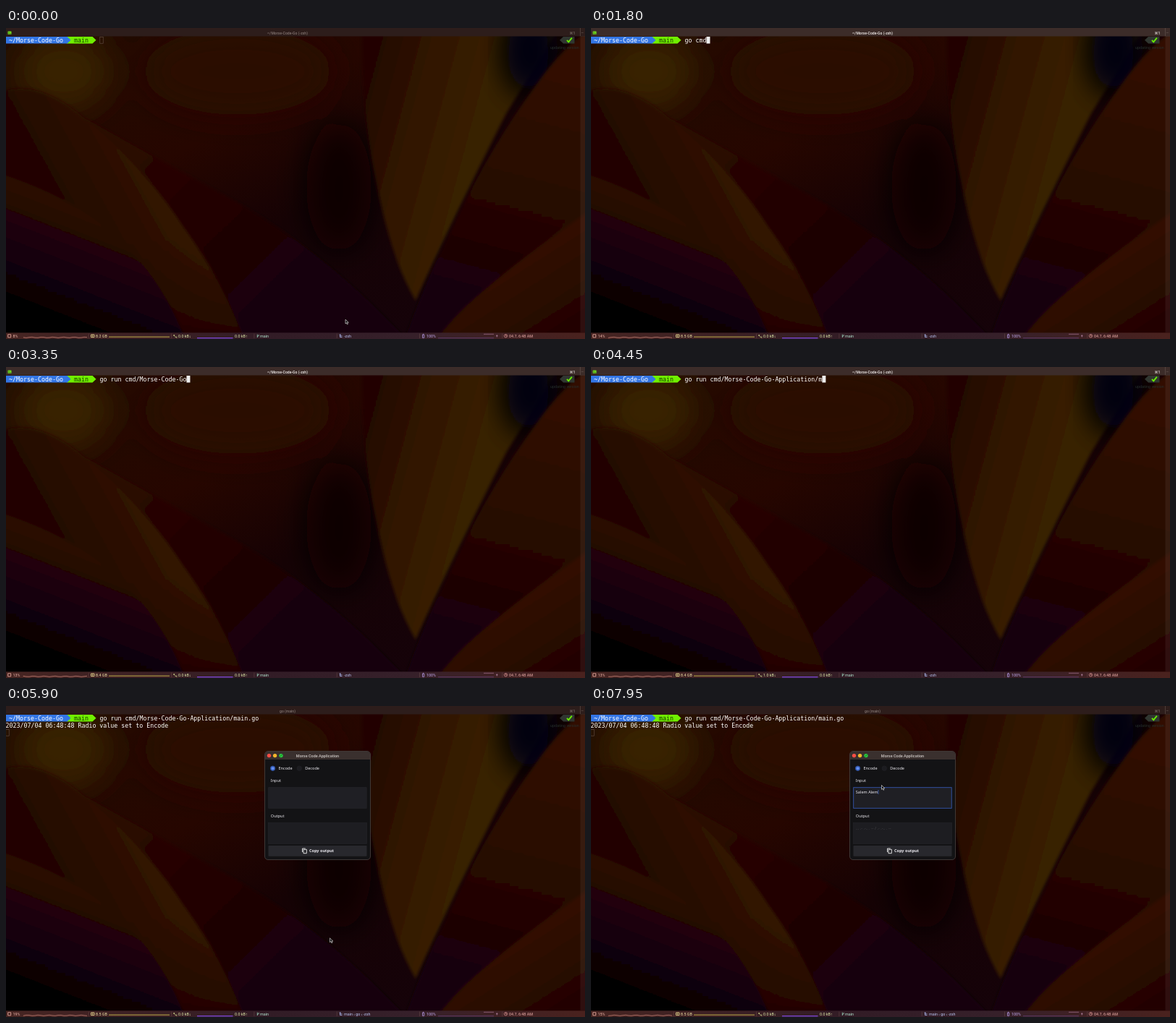
Animation of 800x430 px, one loop 8000 ms. Source, as an HTML page:

```html
<!DOCTYPE html>
<html lang="en">
<head>
<meta charset="utf-8">
<title>Terminal session</title>
<style>
html, body { margin: 0; width: 100%; height: 100%; overflow: hidden; background: #1c0401; }
svg { display: block; width: 100vw; height: 100vh; }
text { white-space: pre; }
.mono { font: 8.3px "DejaVu Sans Mono", monospace; fill: #fff; }
.bar { font: 500 5.1px Roboto, sans-serif; }
.status { font: 5.4px Roboto, sans-serif; }
.app { font: 5.55px "Noto Sans", sans-serif; fill: #eceaf0; }
</style>
</head>
<body>
<svg viewBox="0 0 800 430" preserveAspectRatio="none">
  <defs>
    <filter id="soft" x="-10%" y="-10%" width="120%" height="120%"><feGaussianBlur stdDeviation="2"/></filter>
    <filter id="haze" x="-50%" y="-50%" width="200%" height="200%"><feGaussianBlur stdDeviation="22"/></filter>
    <linearGradient id="base" x2="1" y2="1">
      <stop stop-color="#210d00"/><stop offset=".35" stop-color="#260600"/>
      <stop offset=".55" stop-color="#160204"/><stop offset="1" stop-color="#15030c"/>
    </linearGradient>
    <linearGradient id="mid" gradientUnits="userSpaceOnUse" x1="170" y1="150" x2="440" y2="430">
      <stop stop-color="#2b0800"/><stop offset=".45" stop-color="#200303"/><stop offset="1" stop-color="#13020d"/>
    </linearGradient>
    <linearGradient id="leaf" gradientUnits="userSpaceOnUse" x1="60" y1="260" x2="215" y2="175">
      <stop stop-color="#200400"/><stop offset=".55" stop-color="#2b0c00"/><stop offset="1" stop-color="#361c00"/>
    </linearGradient>
    <linearGradient id="leafEnd" gradientUnits="userSpaceOnUse" x1="0" y1="290" x2="0" y2="425">
      <stop stop-color="#240500" stop-opacity="0"/><stop offset="1" stop-color="#240500"/>
    </linearGradient>
    <linearGradient id="low" gradientUnits="userSpaceOnUse" x1="95" y1="225" x2="30" y2="390">
      <stop stop-color="#300d00"/><stop offset=".4" stop-color="#200508"/><stop offset="1" stop-color="#030206"/>
    </linearGradient>
    <linearGradient id="gold" gradientUnits="userSpaceOnUse" x1="490" y1="120" x2="640" y2="160">
      <stop stop-color="#230600"/><stop offset=".45" stop-color="#301500"/><stop offset="1" stop-color="#392000"/>
    </linearGradient>
    <linearGradient id="right" gradientUnits="userSpaceOnUse" x1="730" y1="60" x2="640" y2="400">
      <stop stop-color="#300f00"/><stop offset=".5" stop-color="#270700"/><stop offset="1" stop-color="#15030b"/>
    </linearGradient>
    <linearGradient id="corner" gradientUnits="userSpaceOnUse" x1="700" y1="320" x2="770" y2="430">
      <stop stop-color="#320d00"/><stop offset="1" stop-color="#220400"/>
    </linearGradient>
    <linearGradient id="foot">
      <stop stop-color="#472522"/><stop offset=".45" stop-color="#321c26"/>
      <stop offset=".7" stop-color="#36202a"/><stop offset="1" stop-color="#4a221e"/>
    </linearGradient>
  </defs>

  <rect width="800" height="430" fill="url(#base)"/>
  <g filter="url(#haze)">
    <ellipse cx="80" cy="60" rx="65" ry="55" fill="#382200"/>
    <ellipse cx="320" cy="60" rx="130" ry="60" fill="#2c0a00"/>
    <ellipse cx="460" cy="220" rx="45" ry="90" fill="#110103"/>
  </g>
  <g filter="url(#soft)">
    <path d="M110 125Q180 165 300 230Q430 300 545 422V440H320Z" fill="url(#mid)"/>
    <path id="left" d="M-10 90Q40 70 100 118Q190 190 245 275Q300 350 332 440H-10Z" fill="url(#leaf)"/>
    <path d="M-10 270H250Q300 350 332 440H-10Z" fill="url(#leafEnd)"/>
    <path d="M-10 201Q100 236 165 300Q220 355 252 440H-10Z" fill="url(#low)"/>
    <path d="M493-10Q488 110 516 235Q535 325 566 377Q605 290 690 120L770-10Z" fill="url(#gold)"/>
  </g>
  <ellipse cx="727" cy="28" rx="36" ry="62" fill="#030208" filter="url(#haze)"/>
  <ellipse cx="722" cy="34" rx="28" ry="54" fill="#04030a" filter="url(#haze)"/>
  <g filter="url(#soft)">
    <path d="M548 440Q575 360 612 285Q665 170 735 75Q770 25 810 0V440Z" fill="url(#right)"/>
    <path d="M810 250Q715 315 650 372Q615 402 588 440H810Z" fill="url(#corner)"/>
  </g>

  <rect id="head" width="800" height="11.5"/>
  <rect x="793.5" y="11" width="6.5" height="410" fill="#fff" opacity=".06"/>
  <path d="M793.5 0V11M794.8 6.5h3" stroke="#776762" stroke-width=".7" opacity=".6"/>
  <g id="termIcon"><rect x="2.5" y="4.6" width="5" height="4.2" rx=".6" fill="#6fd321"/><path d="M3.4 6l1 .8-1 .8M5 7.8h1.5" fill="none" stroke="#203c08" stroke-width=".5"/></g>
  <circle id="gear" cx="4.5" cy="6.7" r="2" fill="none" stroke="#a99f9b" stroke-width="1" stroke-dasharray="1 .4"/>
  <text id="title" class="bar" x="389" y="8.5" text-anchor="middle"></text>
  <text id="tab" class="bar" x="782.5" y="8.5" text-anchor="middle">⌘1</text>

  <path d="M84 12h35.5l5 4.75-5 4.75H84Z" fill="#70f000"/>
  <path d="M0 12h84.500l5 4.750-5 4.750H0Z" fill="#3375e4"/>
  <text class="mono" x="4" y="19.600">~/Morse-Code-Go</text>
  <text class="mono" x="94" y="19.600" style="fill:#173900">main</text>
  <path d="M785.500 12h-15.500l-5 4.750 5 4.750h15.500Z" fill="#303630"/>
  <path d="M775 16.800l2.300 2.500 4.600-5.600" fill="none" stroke="#68ee00" stroke-width="1.900"/>
  <text class="status" x="752" y="28.500" fill="#26302c">updating version</text>
  <text id="cmd" class="mono" x="129.500" y="19.600"></text>
  <text id="log" class="mono" x="-.5" y="29.900">2023/07/04 06:48:48 Radio value set to Encode</text>
  <rect id="caret" width="5" height="9.500"/>

  <g id="app">
    <rect x="357.500" y="62.500" width="146" height="150" rx="4.500" fill="#131315" stroke="#4a4340" stroke-width=".8"/>
    <path d="M358 74v-7q0-4 4-4h137q4 0 4 4v7Z" fill="#3a302e"/>
    <circle cx="363.500" cy="68.600" r="2.700" fill="#fb4e45"/>
    <circle cx="371.600" cy="68.600" r="2.700" fill="#f5b52b"/>
    <circle cx="380" cy="68.600" r="2.700" fill="#2bc840"/>
    <path d="M378.800 69.800l2.400-2.400" stroke="#0c6a18" stroke-width=".9"/>
    <text x="430.500" y="70.500" text-anchor="middle" style="font:700 5.5px Roboto,sans-serif" fill="#b9b2af">Morse Code Application</text>
    <circle cx="368.600" cy="86.200" r="3.200" fill="#4773d6" stroke="#2c4b94" stroke-width="1"/>
    <circle cx="368.600" cy="86.200" r="1.500" fill="#6c95f2"/>
    <circle cx="405.300" cy="86.200" r="3.300" fill="#1c1c20" stroke="#222228" stroke-width=".6"/>
    <text class="app" x="376.500" y="88.200">Encode</text>
    <text class="app" x="413.200" y="88.200">Decode</text>
    <text class="app" x="365.800" y="104.900">Input</text>
    <text class="app" x="365.800" y="153.800">Output</text>
    <rect id="entry" x="362.700" y="112.700" width="135.500" height="28.600" fill="#1f1f24"/>
    <text id="input" class="app" x="365.800" y="121"></text>
    <path id="bar" d="M0 116v6" stroke="#4f78dc" stroke-width=".7"/>
    <rect x="362.500" y="161.500" width="136" height="29" fill="#1d1d21" stroke="#26262b" stroke-width=".6"/>
    <text id="output" class="app" x="365.800" y="170.500" style="fill:#45454b"></text>
    <rect x="362.500" y="193" width="136" height="14.800" rx=".8" fill="#28282d"/>
    <path d="M409.500 202v-5h4.200M411 198.300h4.300v5.400H411Z" fill="none" stroke="#eee" stroke-width=".9"/>
    <text class="app" x="419" y="202.300" font-weight="700" style="font-weight:700">Copy output</text>
  </g>

  <rect y="421.300" width="800" height="8.700" fill="url(#foot)"/>
  <g id="status" class="status"></g>

  <path id="arrow" d="M0 0v5.800l1.400-1.200 1 2.200 1-.5-1-2.100h1.900Z" fill="#111" stroke="#eee" stroke-width=".6"/>
  <path id="beam" d="M-1.500-3.500q1.500 0 1.500 1v5q0 1-1.500 1M1.500-3.500Q0-3.500 0-2.500v5q0 1 1.500 1M-1 .8h2" fill="none" stroke="#e8e8ea" stroke-width=".7"/>
</svg>
<script>
const LOOP = 8000;
const FOCUS = 800, RUN = 4850, LOG = 5300, OPEN = 5800, CLICK = 6300;
const NS = "http://www.w3.org/2000/svg";
const $ = id => document.getElementById(id);
const show = (id, on) => $(id).setAttribute("visibility", on ? "visible" : "hidden");
const set = (el, attrs) => { for (const k in attrs) el.setAttribute(k, attrs[k]); return el; };
const write = (el, s) => { if (el.textContent !== s) el.textContent = s; };

// Keystrokes: start time, interval, text kept before, text typed after it
const typing = [
  [1000, 140, "", "go cmd"],
  [1900, 110, "go ", ""],
  [2150, 110, "go ", "run cmd/M"],
  [3150, 0, "go run cmd/", "Morse-Code-Go"],
  [3600, 150, "go run cmd/Morse-Code-Go", "-A"],
  [4050, 0, "go run cmd/Morse-Code-Go-", "Application/"],
  [4350, 0, "go run cmd/Morse-Code-Go-Application/", "m"],
  [4600, 0, "go run cmd/Morse-Code-Go-Application/", "main.go"]
];
const at = (rows, t) => rows.filter(r => r[0] <= t).pop();

function command(t) {
  const row = at(typing, t);
  if (!row) return "";
  const [start, gap, keep, add] = row;
  const n = gap ? Math.floor((t - start) / gap) + 1 : add.length;
  if (!add) return keep + "cmd".slice(0, Math.max(0, 3 - n));
  return keep + add.slice(0, n);
}

const morse = { s: "...", a: ".-", l: ".-..", e: ".", m: "--", " ": "/" };
const encode = s => [...s.toLowerCase()].map(c => morse[c]).join(" ");

// Status line
const load = [[0, 8, "8.2"], [950, 14, "8.5"], [2950, 13, "8.4"], [4950, 19, "8.5"], [5950, 17, "8.5"], [7000, 15, "8.5"]];
function add(tag, attrs) { return $("status").appendChild(set(document.createElementNS(NS, tag), attrs)); }
function label(x, fill, s = "") {
  const el = add("text", { x, y: 427.8, fill });
  el.textContent = s;
  return el;
}
function line(d, stroke, width = 0.7) { return add("path", { d, stroke, fill: "none", "stroke-width": width }); }

for (let i = 1; i < 7; i++) line(`M${i * 114.3} 422.500v6.500`, "#6a4d4b", 0.5);
line("M2.700 423.800h4v4h-4Z", "#e0a59a", 0.9);
line("M117.500 424h4.500v3.600h-4.500ZM119.700 424v3.600", "#e2d38e", 0.9);
line("M231.500 424l1.500 2M233 424l-1.500 2M233 426.500l2.500 1.500M235.800 426.500v2", "#cfd98f", 0.8);
line("M347.300 428v-4.300M347.300 426.500q2 0 2-2.500", "#9fd8c0", 0.8);
line("M460.500 424h2.500M461.500 424v3.500h3M461.500 425.800h3", "#a9b4ea", 0.8);
line("M575.500 424h2.200v4.300h-2.200ZM576 423.300h1.200", "#b59be6", 0.8);
line("M678.300 424v3.500M677 425.700h2.600", "#c896b8", 0.6);
line("M690.500 424v1.900h1.300M688.300 425.700a2.200 2.200 0 1 0 4.400 0a2.200 2.200 0 1 0-4.400 0", "#e39c9a", 0.7);
const cpuLine = line("", "#d98f80");
line("M142 427.300h84", "#cdb84e");
line("M142 426.500h84", "#8a7a3a", 0.5);
line("M264 428.600h49.500", "#7a46d8", 1.1);
line("M597 428.600h77", "#6f4b8c", 0.6);
line("M660 423.300h14", "#b884a0", 0.6);
const cpu = label(9.500, "#efb8ac");
const mem = label(124, "#efe3a8");
const down = label(238, "#e0ebaa");
label(316, "#e0ebaa", "0.0 kB↑");
label(351, "#b4e8d2", "main");
const proc = label(467, "#b9c3f2");
label(581, "#c3a9f0", "100%");
label(695, "#efb0ac", "04.7, 6:48 AM");

function cpuPath(t) {
  const phase = Math.floor((t + 50) / 1000);
  let d = "M24 428";
  for (let i = 0; i <= 22; i++) d += `L${24 + i * 4} ${(427.8 + 0.5 * Math.sin((i + phase) * 1.7)).toFixed(2)}`;
  return d;
}

const ease = u => { u = Math.max(0, Math.min(1, u)); return u * u * (3 - 2 * u); };
function pointer(t) {
  const a = ease((t - 5700) / 550), b = ease((t - 7600) / 300);
  return [469 - 71 * a + 3.500 * b, 403 - 271 * a - 22.500 * b];
}

function render(t) {
  const running = t >= RUN, open = t >= OPEN;
  const focused = t >= FOCUS && !open;
  set($("head"), { fill: focused ? "#3c2c29" : "#2d1d1b" });
  set($("title"), { fill: focused ? "#f0ebe9" : "#80736f" });
  set($("tab"), { fill: focused ? "#f0ebe9" : "#80736f" });
  write($("title"), open ? "go (main)" : running ? "go (go run cmd/Morse-Code-Go-Application/main.go)" : "~/Morse-Code-Go (-zsh)");
  show("termIcon", !running);
  show("gear", running && !open);

  const cmd = command(t);
  write($("cmd"), cmd);
  show("log", t >= LOG);
  const x = running ? -0.500 : 129.500 + cmd.length * 4.997;
  const y = t >= LOG ? 32 : running ? 22 : 12;
  set($("caret"), focused
    ? { x, y, width: 5, height: 9.500, fill: "#eee", stroke: "none" }
    : { x: x + 0.300, y: y + 0.300, width: 4.400, height: 8.900, fill: "none", stroke: "#66534c", "stroke-width": 0.600 });

  show("app", open);
  const active = t >= CLICK;
  set($("entry"), { stroke: active ? "#3556ad" : "#26262b", "stroke-width": active ? 0.900 : 0.600 });
  const typed = "Salem Alem".slice(0, Math.max(0, Math.floor((t - 6500) / 150) + 1));
  write($("input"), typed);
  write($("output"), typed.length > 2 ? encode(typed) : "");
  const end = 366.300 + (typed ? $("input").getComputedTextLength() : 0);
  set($("bar"), { transform: `translate(${end} 0)` });
  show("bar", open && active);

  const [, pct, gb] = at(load, t);
  write(cpu, pct + "%");
  write(mem, gb + " GB");
  write(down, t >= 3950 && t < 4950 ? "1.0 kB↓" : "0.0 kB↓");
  write(proc, open ? "main ‹ go ‹ -zsh" : running ? "go ‹ -zsh" : "-zsh");
  set(cpuLine, { d: cpuPath(t) });

  const [px, py] = pointer(t);
  const inEntry = open && py > 113 && py < 141;
  const visible = t < 1000 || t >= 5700;
  for (const id of ["arrow", "beam"]) set($(id), { transform: `translate(${px} ${py})` });
  show("arrow", visible && !inEntry);
  show("beam", visible && inEntry);
}

function tick() {
  render(performance.now() % LOOP);
  requestAnimationFrame(tick);
}
tick();
</script>
</body>
</html>
```
